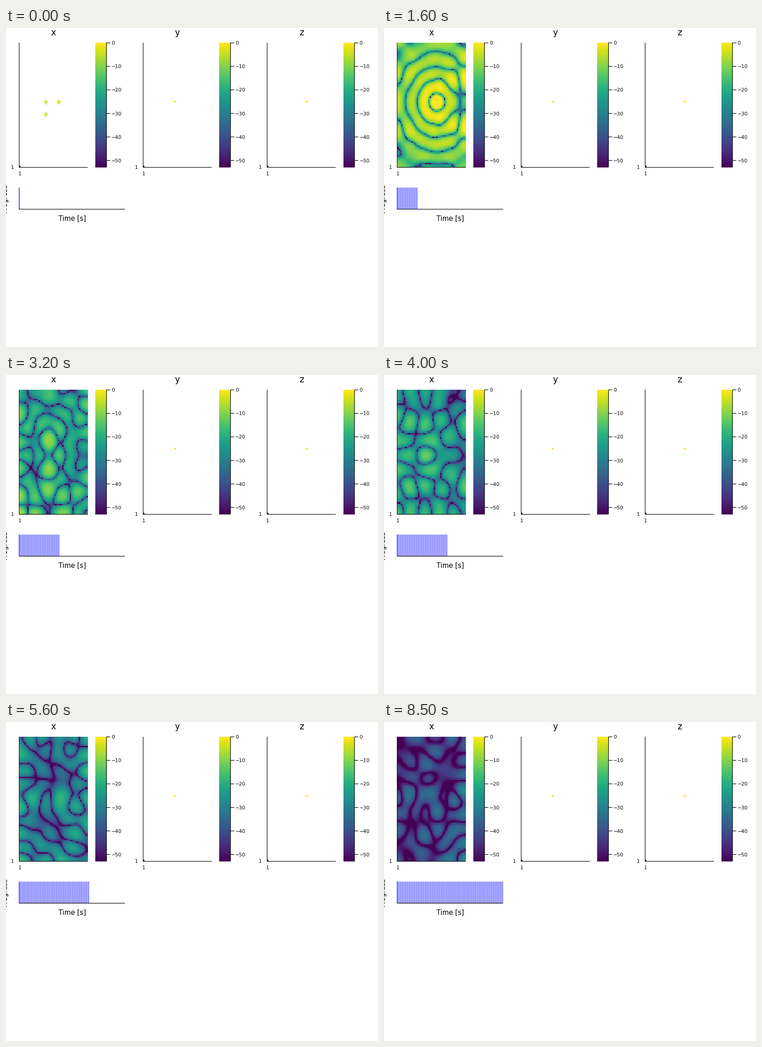
Recreate the animation shown at these times as a matplotlib script. Size 808x693 px, loop 8.6 s.

```python
import numpy as np
import matplotlib.pyplot as plt
from matplotlib.animation import FuncAnimation
from matplotlib.collections import LineCollection
from matplotlib.patches import Rectangle

W, H, DPI = 808, 693, 100
FRAMES, INTERVAL = 86, 100
PX = 72 / DPI                       # one pixel in points
LEFT, RIGHT, TOP, BOTTOM = 28.6, 177.6, 32, 302.7

ROWS, COLS = 81, 53
SOURCES = [(38, 30), (38, 20), (46, 20)]
FLOOR = -53
STEPS = 5                           # solver steps per frame
C2, VISC = 0.42, 0.02
OMEGA = 2 * np.pi * np.sqrt(C2) / 17.6
LEVEL_T = [16, 24, 40, 56, 70, 85]
LEVEL_DB = [-10, -20, -26, -32, -38, -44]


def laplacian(p):
    q = np.pad(p, 1, mode="edge")
    return q[:-2, 1:-1] + q[2:, 1:-1] + q[1:-1, :-2] + q[1:-1, 2:] - 4 * p


def smooth(x):
    x = np.clip(x, 0, 1)
    return x * x * (3 - 2 * x)


def drive(k):
    """Burst from the main source, plus a click at all three points."""
    s = np.zeros((ROWS, COLS))
    for cell in SOURCES:
        s[cell] = 1.4 * np.exp(-k / 3)
    env = 4 * smooth(k / 40) * smooth((114 - k) / 40)
    s[SOURCES[0]] += env * np.cos(OMEGA * (k - 82) + 1.26)
    return s - s.mean()


def simulate():
    rr, cc = np.mgrid[:ROWS, :COLS]
    dist = np.min([abs(rr - r) + abs(cc - c) for r, c in SOURCES], axis=0)
    prev = np.zeros((ROWS, COLS))
    cur = prev.copy()
    fields, step = [], 0
    for n in range(FRAMES):
        while step < 2 + STEPS * n:
            new = (2 * cur - prev + C2 * laplacian(cur)
                   + VISC * laplacian(cur - prev) + drive(step))
            prev, cur = cur, new
            step += 1
        db = 20 * np.log10(np.abs(cur) + 1e-12)
        fields.append(np.ma.masked_where(dist >= step, db))

    def gain(n):
        return np.interp(n, LEVEL_T, LEVEL_DB) - np.ma.median(fields[n])

    first = LEVEL_T[0]
    gains = [gain(n) if n >= first else gain(first) * n / first
             for n in range(FRAMES)]
    return [np.ma.clip(f + g, FLOOR, 0) for f, g in zip(fields, gains)]


fields = simulate()

plt.rcParams["font.family"] = "DejaVu Sans"
fig = plt.figure(figsize=(W / DPI, H / DPI), dpi=DPI, facecolor="white")
ax = fig.add_axes([0, 0, 1, 1])
ax.axis("off")


def line(x, y, **kw):
    ax.plot(x, y, color="black", lw=1.2 * PX, solid_capstyle="butt",
            snap=False, **kw)


def label(x, y, s, size, ha="center", **kw):
    ax.text(x, y, s, fontsize=size * PX, ha=ha, va="baseline", **kw)


def panel(x0, title):
    left, right = x0 + LEFT, x0 + RIGHT
    line([left, left], [TOP, BOTTOM + 0.5])
    line([left, right], [BOTTOM, BOTTOM], zorder=4)
    line([left + 1.4, left + 1.4], [BOTTOM, BOTTOM - 4])
    line([left, left + 3], [BOTTOM - 1.7, BOTTOM - 1.7])
    label(x0 + 103, 16, title, 18.67)
    label(x0 + 14, 305.5, "1", 10.67)
    label(x0 + 30, 320, "1", 10.67)

    ramp = np.linspace(0, FLOOR, 270)[:, None]
    ax.imshow(ramp, cmap="viridis", vmin=FLOOR, vmax=0, aspect="auto",
              extent=(x0 + 194, x0 + 218, BOTTOM, TOP))
    line([x0 + 218.3] * 2, [TOP, BOTTOM])
    for v in range(0, -51, -10):
        y = TOP + 0.3 + (BOTTOM - TOP) * v / FLOOR
        line([x0 + 218, x0 + 226.5], [y, y])
        text = "0" if v == 0 else f"\u2212{-v}"
        label(x0 + 229, y + 4, text, 10.67, ha="left")


for i, name in enumerate("xyz"):
    panel(W / 3 * i, name)
for x in (365, 651):
    ax.add_patch(Rectangle((x, 158), 4, 4, color="#fde725", lw=0))

line([LEFT, LEFT], [346.7, 394])
line([LEFT, 258.6], [393.6, 393.6], zorder=4)
label(144, 418.6, "Time [s]", 14.67)
label(1.5, 370, "Progress", 14.67, rotation=90, rotation_mode="anchor")

heat = ax.imshow(fields[0], cmap="viridis", vmin=FLOOR, vmax=0,
                 interpolation="nearest", aspect="auto", zorder=3,
                 extent=(LEFT, RIGHT - 0.5, BOTTOM, TOP))
bars = LineCollection([], colors="blue", linewidths=PX, zorder=3, snap=False)
ax.add_collection(bars)
ax.set_xlim(0, W)
ax.set_ylim(H, 0)


def update(n):
    heat.set_data(fields[n])
    xs = LEFT + 0.1 + 2.695 * np.arange(n + 1)
    bars.set_segments([[(x, 346.7), (x, 393.3)] for x in xs])
    return heat, bars


anim = FuncAnimation(fig, update, frames=FRAMES, interval=INTERVAL,
                     init_func=lambda: update(0), repeat=True, repeat_delay=0)
plt.show()
```
